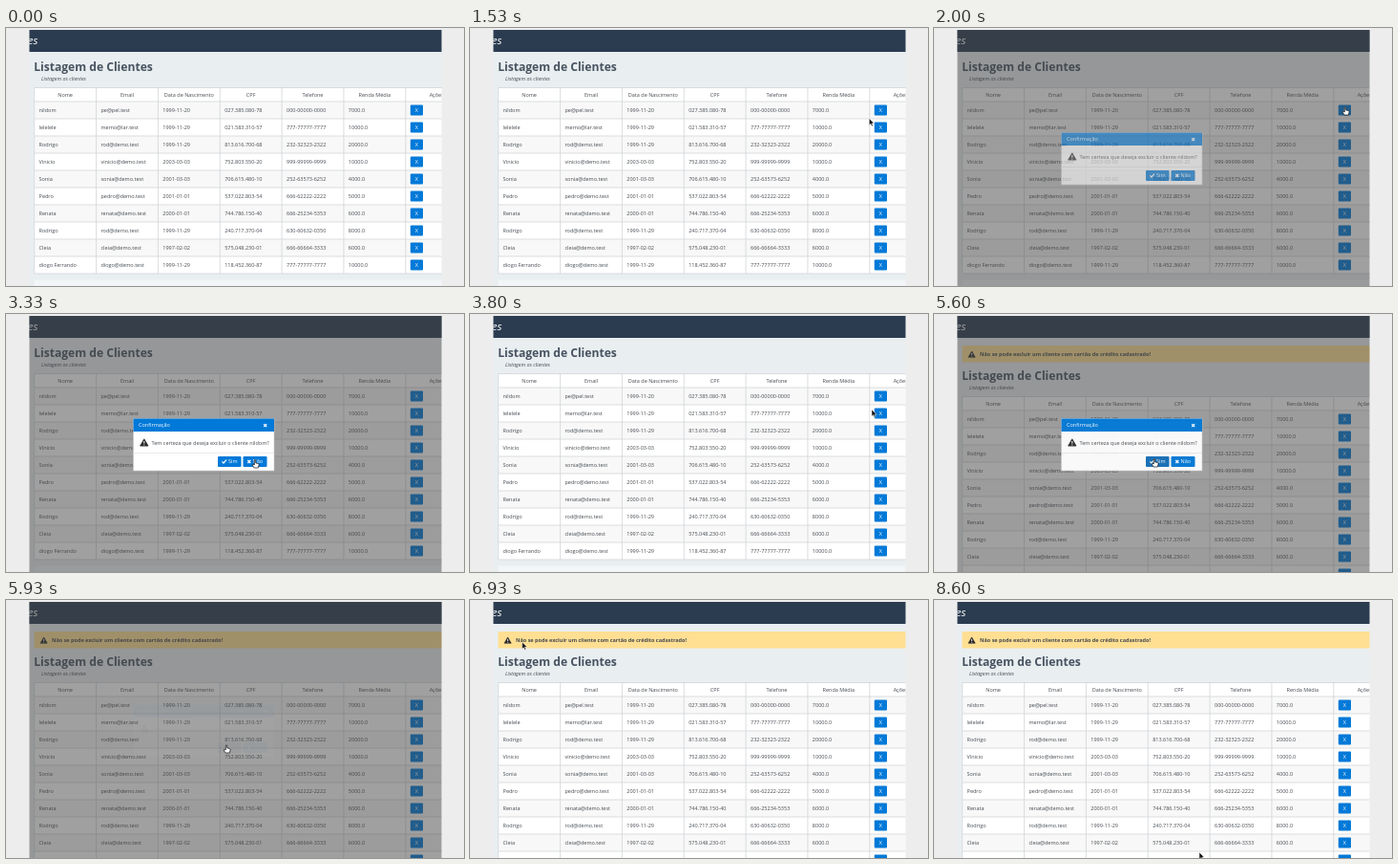
Write an HTML page that moves like this. It is 480x270 px and loops after 8670 ms.

```html
<!DOCTYPE html>
<html lang="pt">
<head>
<meta charset="utf-8">
<title>Listagem de Clientes</title>
<style>
html, body { margin: 0; width: 100%; height: 100%; overflow: hidden; background: #ededed; }
svg { display: block; width: 480px; height: 270px; font: 5.5px "Open Sans", sans-serif; }
text { fill: #454a50; white-space: pre; }
.mid { text-anchor: middle; }
.bold { font-weight: 700; }
.light { fill: #fff; }
.blue { fill: #0079d8; }
</style>
</head>
<body>
<svg viewBox="0 0 480 270">
  <defs>
    <clipPath id="page"><rect x="24.5" y="2" width="432" height="268"/></clipPath>
    <g id="warn">
      <path d="M0-3.8 4.2 3.5H-4.2Z" fill="#2b2b2b" stroke="#2b2b2b" stroke-width=".8" stroke-linejoin="round"/>
      <path d="M0-1.6V1M0 1.9V2.9" stroke="#fff" stroke-width="1"/>
    </g>
    <path id="cross" d="M-1.5-1.5 1.5 1.5M1.5-1.5-1.5 1.5" stroke="#fff" stroke-width="1.3"/>
  </defs>
  <g clip-path="url(#page)">
    <rect x="24" width="433" height="270" fill="#e9eef1"/>
    <rect x="24" y="2" width="433" height="23" fill="#2b3c50"/>
    <text x="22.8" y="17.2" class="light" font-size="11.5" font-style="italic">es</text>
    <g id="notice">
      <rect x="29.5" y="33" width="430" height="17.5" rx="1" fill="#ffdf92"/>
      <use href="#warn" transform="translate(39.6 42.2) scale(.85)"/>
      <text x="48" y="44" class="bold">Não se pode excluir um cliente com cartão de crédito cadastrado!</text>
    </g>
    <g id="list">
      <text x="29.2" y="45.4" class="bold" font-size="12.1" style="fill:#46525f">Listagem de Clientes</text>
      <text x="37" y="54.6" font-size="5.4" font-style="italic">Listagem os clientes</text>
      <g id="table"></g>
    </g>
    <rect id="shade" x="24" y="2" width="433" height="268" fill="#424242" fill-opacity=".5"/>
    <g id="dialog">
      <rect x="133.5" y="109.5" width="147.5" height="54.5" fill="#fff" stroke="#c8c8c8" stroke-width=".6"/>
      <rect x="133.5" y="109.5" width="147.5" height="13.5" class="blue"/>
      <text x="139" y="118.3" class="light">Confirmação</text>
      <use href="#cross" x="271.7" y="116.6"/>
      <use href="#warn" x="144.8" y="134.6"/>
      <text x="152.5" y="137">Tem certeza que deseja excluir o cliente nildom?</text>
      <path d="M133.5 145.5H281" stroke="#e3e3e3" stroke-width=".7"/>
      <rect id="yes" x="222" y="149" width="24.5" height="11" rx="1" class="blue"/>
      <path d="M226.4 154.3 228 156 231 152.7" fill="none" stroke="#fff" stroke-width="1.2"/>
      <text x="233" y="156.4" class="light">Sim</text>
      <rect x="248.5" y="149" width="25" height="11" rx="1" class="blue"/>
      <use href="#cross" x="254.8" y="154.5"/>
      <text x="258.6" y="156.4" class="light">Não</text>
    </g>
  </g>
  <g id="cursor">
    <path data-kind="arrow" d="M0 0V7.2L1.7 5.7 2.8 8.2 4 7.7 2.9 5.2H5.2Z" fill="#111" stroke="#fff" stroke-width=".5"/>
    <path data-kind="hand" d="M-.7 0Q0-.8.7 0V2.9L3.6 3.6Q4.3 3.9 4 5.2L3.3 8H-.9L-3 4.9Q-2.7 3.7-.7 5Z" fill="#fff" stroke="#111" stroke-width=".7"/>
    <path data-kind="beam" d="M-1.5-3.5H1.5M0-3.5V3.5M-1.5 3.5H1.5" fill="none" stroke="#111" stroke-width=".8"/>
  </g>
</svg>
<script>
const LOOP = 8670, FRAMES = 130;
const $ = id => document.getElementById(id);

const heads = ['Nome', 'Email', 'Data de Nascimento', 'CPF', 'Telefone', 'Renda Média', 'Ações'];
const rows = `nildom|pe@pel.test|1999-11-20|027.385.080-78|000-00000-0000|7000.0
lelelele|memo@lar.test|1999-11-29|021.583.310-57|777-77777-7777|10000.0
Rodrigo|rod@demo.test|1999-11-29|813.616.700-68|232-32323-2322|20000.0
Vinicio|vinicio@demo.test|2003-03-03|752.803.550-20|999-99999-9999|10000.0
Sonia|sonia@demo.test|2001-03-03|706.615.480-10|252-63573-6252|4000.0
Pedro|pedro@demo.test|2001-01-01|537.022.803-54|666-62222-2222|5000.0
Renata|renata@demo.test|2000-01-01|744.786.150-40|666-25234-5353|6000.0
Rodrigo|rod@demo.test|1999-11-29|240.717.370-04|630-60632-0350|8000.0
Cleia|cleia@demo.test|1997-02-02|575.048.230-01|666-66664-3333|6000.0
diogo Ferrando|diogo@demo.test|1999-11-29|118.452.360-87|777-77777-7777|10000.0`
  .split('\n').map(line => line.split('|'));

const LEFT = 29.7, COL = 64.85, TOP = 62.5, HEAD = 14.5, ROW = 18;
const colX = i => LEFT + i * COL;
const rect = (x, y, w, h, attrs) => `<rect x="${x}" y="${y}" width="${w}" height="${h}" ${attrs}/>`;
const label = (x, y, s, cls = '') => `<text x="${x}" y="${y}" class="${cls}">${s}</text>`;

function buildTable() {
  const bottom = TOP + HEAD + rows.length * ROW;
  let out = rect(LEFT, TOP, 430, bottom - TOP, 'fill="#fff"');
  let lines = `M${LEFT} ${TOP}H457`;
  heads.forEach((h, i) => {
    out += label(colX(i) + COL / 2, 71.7, h, 'mid');
    lines += `M${colX(i)} ${TOP}V${bottom}`;
  });
  rows.forEach((row, r) => {
    const y = TOP + HEAD + r * ROW, mid = y + ROW / 2;
    if (r % 2 === 0) out += rect(LEFT, y, 430, ROW, 'fill="#f8f8f8"');
    row.forEach((s, i) => out += label(colX(i) + 4.9, mid + 2, s));
    out += rect(423.8, mid - 5.6, 13.2, 11.2, 'rx="1" class="blue"');
    out += label(430.4, mid + 1.9, 'X', 'mid light');
    lines += `M${LEFT} ${y}H457`;
  });
  lines += `M${LEFT} ${bottom}H457`;
  out += `<path d="${lines}" fill="none" stroke="#d2d5d8" stroke-width=".8"/>`;
  out += rect(29.7, bottom + 6.5, 430, 40, 'fill="#f3f6f8"');
  $('table').innerHTML = out;
}

// time, x, y, pointer shape from that time on
const path = [
  [870, 254, 230, 'arrow'], [1330, 395, 116, 'arrow'], [1670, 431, 83, 'hand'],
  [2600, 431, 83, 'arrow'], [3130, 261, 153, 'hand'], [3270, 261, 153, 'arrow'],
  [3800, 421, 100, 'arrow'], [4070, 430, 83, 'hand'], [4270, 430, 83, 'arrow'],
  [4600, 274, 135, 'beam'], [4730, 267, 137, 'beam'], [5070, 231, 152, 'hand'],
  [5930, 231, 152, 'arrow'], [6400, 231, 152, 'arrow'], [6930, 48, 40, 'arrow'],
  [7200, 38, 38, 'arrow'], [7300, 38, 38, 'arrow'], [8130, 226, 42, 'arrow'],
  [8600, 278, 264, 'arrow'], [LOOP, 278, 264, 'arrow']
];
// shade on, fade-in start, fade-out start, end
const opens = [[1800, 1860, 3270, 3600], [4200, 4260, 5550, 5900]];
const FADE_IN = 260, NOTICE_AT = 5330;

const clamp = v => Math.max(0, Math.min(1, v));
const ease = v => v * v * (3 - 2 * v);
const show = (el, on) => el.setAttribute('visibility', on ? 'visible' : 'hidden');
const shapes = [...$('cursor').children];

function drawCursor(t) {
  const i = path.findIndex((p, k) => k + 1 < path.length && t >= p[0] && t < path[k + 1][0]);
  if (i < 0) return shapes.forEach(s => show(s, false));
  const [t0, x0, y0, kind] = path[i], [t1, x1, y1] = path[i + 1];
  const k = ease((t - t0) / (t1 - t0));
  $('cursor').setAttribute('transform', `translate(${x0 + (x1 - x0) * k} ${y0 + (y1 - y0) * k})`);
  shapes.forEach(s => show(s, s.dataset.kind === kind));
}

function draw(t) {
  const open = opens.find(o => t >= o[0] && t < o[3]);
  show($('shade'), open);
  $('dialog').setAttribute('opacity', open
    ? ease(clamp((t - open[1]) / FADE_IN)) * (1 - ease(clamp((t - open[2]) / (open[3] - open[2])))) : 0);
  $('yes').style.fill = t >= 5070 && t < 5930 ? '#156fb8' : '';
  const noticed = t >= NOTICE_AT;
  show($('notice'), noticed);
  $('list').setAttribute('transform', `translate(0 ${noticed ? 24 : 0})`);
  drawCursor(t);
}

buildTable();
const start = performance.now();
function tick() {
  const t = (performance.now() - start) % LOOP;
  draw(Math.floor(t * FRAMES / LOOP + 0.05) * LOOP / FRAMES);
  requestAnimationFrame(tick);
}
tick();
</script>
</body>
</html>
```
